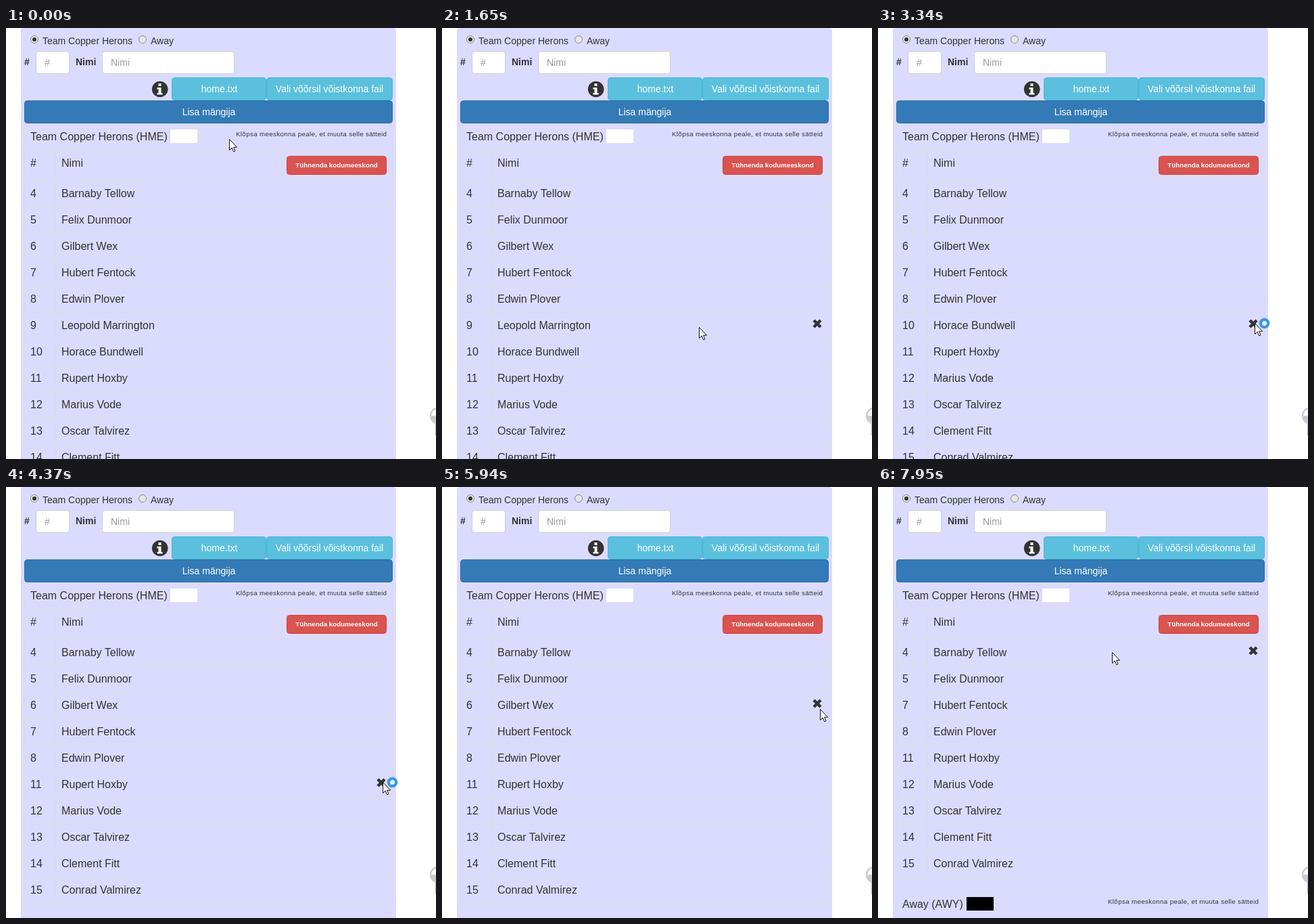
Write an HTML page that moves like this. It is 636x637 px and loops after 8000 ms.

```html
<!DOCTYPE html>
<html lang="et">
<head>
<meta charset="utf-8">
<title>Meeskonnad</title>
<style>
html, body { margin: 0; width: 100%; height: 100%; overflow: hidden; background: #fff; }
svg { display: block; font: 14px "Liberation Sans", Arial, sans-serif; fill: #333; }
.big { font-size: 16px; }
.hint { font-size: 9.8px; letter-spacing: .33px; }
.bold { font-weight: bold; }
.soft { fill: #999; }
.btn { fill: #fff; text-anchor: middle; }
.field { fill: #fff; stroke: #ccc; }
.info { fill: #5bc0de; stroke: #46b8da; }
.radio { fill: #e6e6e6; stroke: #8a8a8a; }
.grid { fill: none; stroke: #ddd; }
</style>
</head>
<body>
<svg width="636" height="637" viewBox="0 0 636 637">
  <path d="M22 637V4q0-4 4-4H573q4 0 4 4V637z" fill="#dbdbff"/>

  <circle class="radio" cx="42" cy="17" r="5.5"/>
  <circle cx="42" cy="17" r="3"/>
  <text x="54" y="24">Team Copper Herons</text>
  <circle class="radio" cx="202" cy="17" r="5.5"/>
  <text x="214" y="24">Away</text>

  <text class="bold" x="27" y="55">#</text>
  <rect class="field" x="44.5" y="34.5" width="49" height="33" rx="4"/>
  <text class="soft" x="57" y="56">#</text>
  <text class="bold" x="103" y="55">Nimi</text>
  <rect class="field" x="142.5" y="34.5" width="195" height="33" rx="4"/>
  <text class="soft" x="155" y="56">Nimi</text>

  <path id="grid" class="grid"/>

  <circle cx="227.7" cy="90.5" r="11.8"/>
  <path d="M225.5 82h4v4h-4zM223.5 88h6v8h2v2.5h-8V96h2v-5.5h-2z" fill="#fff"/>
  <rect class="info" x="245.5" y="73.5" width="139" height="33" rx="4"/>
  <rect class="info" x="385.5" y="73.5" width="186" height="33" rx="4"/>
  <text class="btn" x="315.5" y="95">home.txt</text>
  <text class="btn" x="478.5" y="95">Vali võõrsil võistkonna fail</text>
  <rect x="27.5" y="107.5" width="544" height="33" rx="4" fill="#337ab7" stroke="#2e6da4"/>
  <text class="btn" x="300" y="129">Lisa mängija</text>

  <text class="big" x="36" y="166">Team Copper Herons (HME)</text>
  <rect x="243" y="150" width="40" height="20" fill="#fff"/>
  <text class="hint" x="340" y="160">Klõpsa meeskonna peale, et muuta selle sätteid</text>
  <text class="big" x="36" y="205">#</text>
  <text class="big" x="82" y="205">Nimi</text>
  <rect x="415.5" y="189.5" width="147" height="27" rx="4" fill="#d9534f" stroke="#d43f3a"/>
  <text class="btn bold" x="489" y="206" font-size="9.8">Tühnenda kodumeeskond</text>

  <g id="rows" class="big"></g>
  <g id="away">
    <path class="grid" d="M27.5 637V597.5H571.5V637M27 636.5H572"/>
    <text class="big" x="36" y="622">Away (AWY)</text>
    <rect x="131" y="606" width="40" height="20" fill="#000"/>
    <text class="hint" x="340" y="616">Klõpsa meeskonna peale, et muuta selle sätteid</text>
  </g>

  <circle cx="639" cy="573" r="11" fill="#fff" stroke="#ccc" stroke-width="2.5"/>
  <path d="M628 573H636V602H634.5V584Q628 581 628 573z" fill="#ccc"/>

  <path id="remove" d="M550 237l10 10m0-10l-10 10" stroke="#333" stroke-width="4.5"/>
  <g id="cursor">
    <circle id="busy" cx="14.5" cy="0.5" r="5.7" fill="#e4f1ff" stroke="#3b96ea" stroke-width="4.2"/>
    <path d="M.5.5V16.5L4.2 13 6.7 18.8 9 17.8 6.5 12.2H11.5z" fill="#fff" stroke="#111"/>
  </g>
</svg>
<script>
const LOOP = 8000, ROW = 39, TOP = 225;
const $ = id => document.getElementById(id);

const names = ['Barnaby Tellow', 'Felix Dunmoor', 'Gilbert Wex', 'Hubert Fentock',
  'Edwin Plover', 'Leopold Marrington', 'Horace Bundwell', 'Rupert Hoxby',
  'Marius Vode', 'Oscar Talvirez', 'Clement Fitt', 'Conrad Valmirez'];
const removedAt = { 9: 3340, 10: 4370, 6: 6510 };

const players = names.map((name, i) => {
  const no = i + 4;
  $('rows').insertAdjacentHTML('beforeend',
    `<g><text x="36" y="250">${no}</text><text x="82" y="250">${name}</text></g>`);
  return { el: $('rows').lastChild, end: removedAt[no] ?? Infinity };
});

// Each move runs in even steps from start to end; keys are [step, x, y].
const moves = [
  { start: 790, end: 1580, steps: 11, keys: [[0, 330, 164], [2, 326, 182], [4, 331, 215],
    [6, 341, 258], [8, 366, 330], [10, 379, 410], [11, 381, 436]] },
  { start: 1650, end: 1650, steps: 1, keys: [[1, 380, 442]] },
  { start: 1970, end: 2700, steps: 10, keys: [[0, 380, 442], [3, 420, 444], [7, 497, 442], [10, 552, 436]] },
  { start: 2780, end: 2780, steps: 1, keys: [[1, 557, 436]] },
  { start: 4700, end: 5090, steps: 6, keys: [[0, 557, 436], [3, 560, 392], [6, 562, 348]] },
  { start: 5560, end: 5630, steps: 2, keys: [[0, 562, 348], [2, 560, 335]] },
  { start: 5940, end: 6020, steps: 2, keys: [[0, 560, 335], [2, 558, 321]] },
  { start: 7540, end: 7950, steps: 6, keys: [[0, 558, 321], [4, 387, 301], [6, 346, 244]] }
];

function pointer(t) {
  const m = moves.findLast(m => t >= m.start);
  if (!m) return moves[0].keys[0].slice(1);
  const span = m.end - m.start;
  // the small bias absorbs uneven step lengths
  const step = span ? Math.min(m.steps, 1 + Math.floor((t - m.start) / span * (m.steps - 1) + .2)) : m.steps;
  const i = m.keys.findIndex(k => k[0] >= step);
  const b = m.keys[i], a = m.keys[i - 1] ?? b;
  const u = a === b ? 1 : (step - a[0]) / (b[0] - a[0]);
  return [1, 2].map(j => Math.round(a[j] + (b[j] - a[j]) * u));
}

const place = (el, x, y) => el.setAttribute('transform', `translate(${x} ${y})`);
const show = (el, on) => { el.style.display = on ? '' : 'none'; };

// Table borders: outer frame, number column and one line under each row.
function gridPath(count) {
  const bottom = TOP + ROW * count + .5;
  let d = `M27.5 141.5H571.5V${bottom}H27.5zM73.5 180.5V${bottom}M27 180.5H572`;
  for (let y = TOP + .5; y < bottom; y += ROW) d += `M27 ${y}H572`;
  return d;
}

function draw(t) {
  let count = 0;
  for (const p of players) {
    const on = t < p.end;
    show(p.el, on);
    if (on) place(p.el, 0, ROW * count++);
  }
  $('grid').setAttribute('d', gridPath(count));
  place($('away'), 0, ROW * (count - 9));

  const [x, y] = pointer(t);
  const hovered = Math.floor((y - TOP) / ROW);
  show($('remove'), hovered >= 0);
  place($('remove'), 0, ROW * hovered);
  place($('cursor'), x, y);
  show($('busy'), t >= 3340 && t < 5940);
}

const begin = performance.now();
function tick() {
  draw((performance.now() - begin) % LOOP);
  requestAnimationFrame(tick);
}
tick();
</script>
</body>
</html>
```
